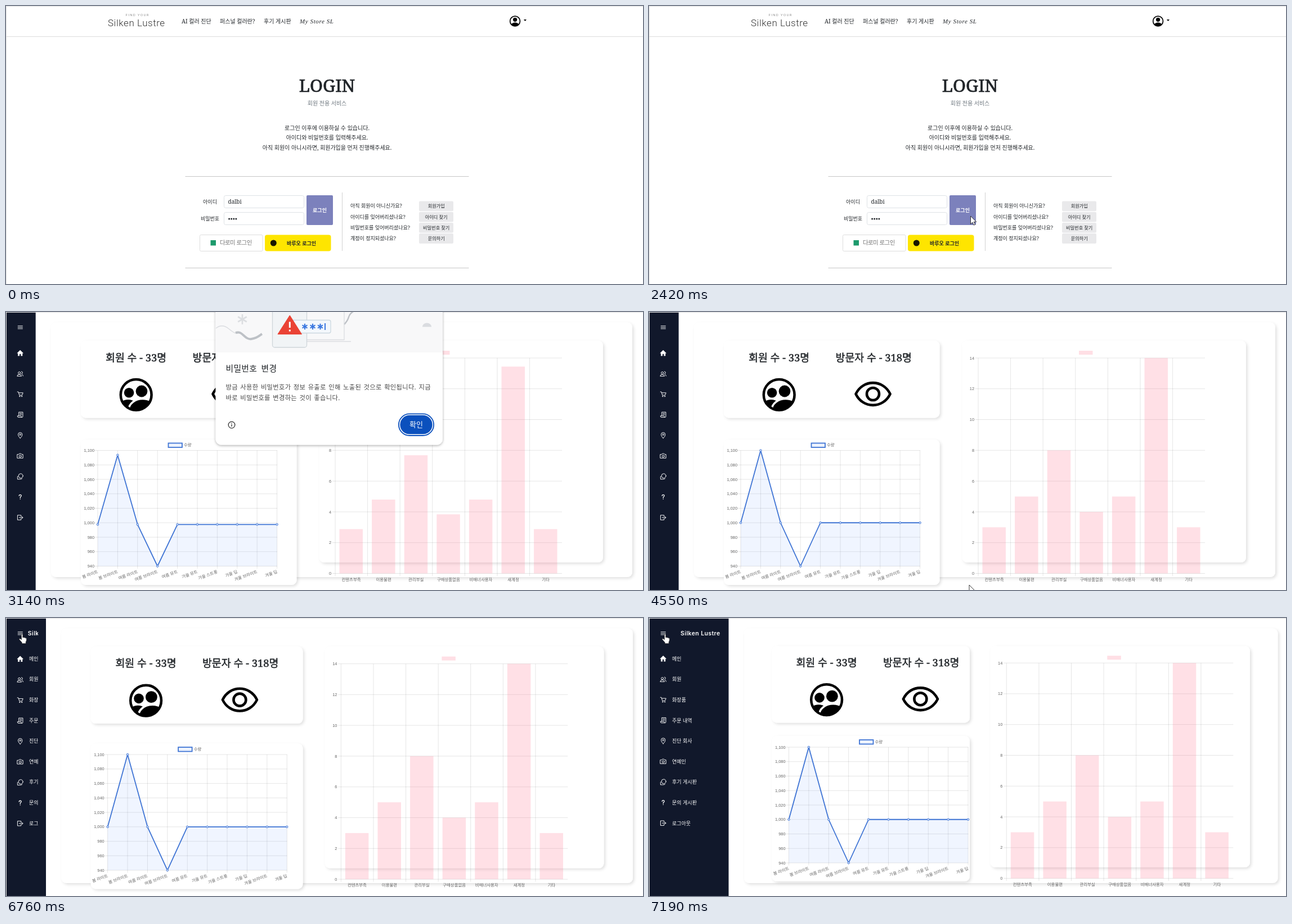
An HTML page for the animation above (8100 ms loop, 1132 by 495 pixels).

```html
<!DOCTYPE html>
<html lang="ko">
<head>
<meta charset="utf-8">
<title>Login and dashboard</title>
<style>
html, body { margin: 0; width: 100%; height: 100%; overflow: hidden; background: #fff; }
svg { display: block; width: 100%; height: 100%; }
text { font-family: "Noto Serif", "Noto Sans CJK KR", "Noto Sans CJK", serif; fill: #212529; }
.sans text, text.sans { font-family: "Noto Sans CJK KR", "Noto Sans CJK", sans-serif; }
.chart text { font-family: "Liberation Sans", "Noto Sans CJK KR", "Noto Sans CJK", sans-serif; font-size: 7.4px; fill: #666; }
.note { letter-spacing: .3px; word-spacing: 1px; }
.grid { stroke: #000; stroke-opacity: .1; fill: none; }
.icon { fill: none; stroke: #fff; stroke-width: 1; stroke-linejoin: round; stroke-linecap: round; }
</style>
</head>
<body>
<svg id="stage" viewBox="0 0 1132 495" preserveAspectRatio="none"></svg>
<script>
const LOOP = 8100;
// [first step, last step, number of steps]
const STEPS = [
  [0, 0, 1], [1200, 2010, 9], [2110, 2420, 4], [2540, 2840, 4], [2940, 3540, 7], [3950, 3950, 1],
  [4550, 5360, 9], [5460, 5960, 6], [6560, 6760, 3], [6870, 7190, 4]
];
const BLUE = '#3f74d4';

const range = n => Array.from({ length: n }, (_, i) => i);
const mix = (a, b, p) => a + (b - a) * p;
const clamp = v => Math.max(0, Math.min(1, v));
const $ = id => document.getElementById(id);

const text = (x, y, size, str, more = '') => `<text x="${x}" y="${y}" font-size="${size}" ${more}>${str}</text>`;
const mid = (x, y, size, str, more = '') => text(x, y, size, str, 'text-anchor="middle" ' + more);
const rect = (x, y, w, h, r, fill, more = '') =>
  `<rect x="${x}" y="${y}" width="${w}" height="${h}" rx="${r}" fill="${fill}" ${more}/>`;
const circle = (x, y, r, more = '') => `<circle cx="${x}" cy="${y}" r="${r}" ${more}/>`;
const path = (d, more = '') => `<path d="${d}" ${more}/>`;
const frameEdge = path('M0 .5H1132M.5 0V495', 'stroke="#e2e2e2"');

// ---- login page ----
function loginPage() {
  const help = [
    ['아직 회원이 아니신가요?', '회원가입'], ['아이디를 잊어버리셨나요?', '아이디 찾기'],
    ['비밀번호를 잊어버리셨나요?', '비밀번호 찾기'], ['계정이 정지되셨나요?', '문의하기']
  ];
  return rect(0, 0, 1132, 495, 0, '#fff') + frameEdge + path('M0 54.5H1132', 'stroke="#dcdcdc"') +
    mid(233.7, 18.3, 6, 'FIND YOUR', 'style="font-family:Roboto,sans-serif;font-weight:300;letter-spacing:1.4px;fill:#555"') +
    text(181, 36, 17, 'Silken Lustre', 'style="font-family:Roboto,sans-serif;font-weight:300;letter-spacing:.55px;fill:#333"') +
    text(312, 30.5, 10, 'AI 컬러 진단') + text(380, 30.5, 10, '퍼스널 컬러란?') + text(458, 30.5, 10, '후기 게시판') +
    text(522, 31, 11, 'My Store SL', 'style="font-family:\'Liberation Serif\',serif;font-style:italic;letter-spacing:.6px"') +
    circle(904.6, 27, 8.9, 'fill="#fff" stroke="#000" stroke-width="1.7"') + circle(904.6, 24.3, 3.6) +
    path('M897.6 32.2Q904.6 26.5 911.6 32.2Q904.6 39 897.6 32.2Z') + path('M920 24H925L922.5 27Z') +
    mid(570.5, 153, 31, 'LOGIN', 'stroke="#212529" stroke-width=".7"') +
    mid(570.5, 176.5, 10, '회원 전용 서비스', 'style="fill:#6c757d"') +
    mid(570.5, 220.7, 10, '로그인 이후에 이용하실 수 있습니다.') +
    mid(570.5, 238.2, 10, '아이디와 비밀번호를 입력해주세요.') +
    mid(570.5, 255.7, 10, '아직 회원이 아니시라면, 회원가입을 먼저 진행해주세요.') +
    path('M318.5 303.5H822.5M318.5 466.5H822.5', 'stroke="#c6c6c6"') + path('M597.5 332V436', 'stroke="#d2d2d2"') +
    mid(362.5, 351.6, 9, '아이디') + mid(362.5, 381.6, 9, '비밀번호') +
    rect(387.5, 337.5, 142, 22, 3, '#fff', 'stroke="#dee2e6"') + rect(387.5, 367.5, 142, 22, 3, '#fff', 'stroke="#dee2e6"') +
    text(394.5, 352, 10, 'dalbi') + range(4).map(i => circle(396.6 + i * 4.1, 379, 1.5, 'fill="#212529"')).join('') +
    rect(534, 337, 47, 53, 2, '#7c81bc') + mid(557.5, 366.6, 9, '로그인', 'font-weight="700" style="fill:#fff"') +
    rect(344.5, 407.5, 111.5, 29, 2, '#fff', 'stroke="#dedede"') + rect(363.5, 417, 9.5, 9.5, 0, '#1d9a6c') +
    text(380, 425.3, 10.5, '다로미 로그인', 'class="sans" style="fill:#777;letter-spacing:-.6px"') +
    rect(460, 407.5, 117.5, 29, 4, '#fee500') + circle(475.3, 422, 5.5, 'fill="#181600"') +
    mid(525, 425.5, 9, '바루오 로그인', 'class="sans" font-weight="700"') +
    help.map(([q, b], i) => text(612, 359.3 + i * 19.2, 9, q) +
      rect(734, 347.5 + i * 19.2, 61, 17.8, 2, '#e9e9eb') + mid(764.7, 359.4 + i * 19.2, 8.2, b)).join('');
}

// ---- dashboard ----
// cards as [left, top, right, bottom], sidebar closed and open
const CARDS = [
  [[80, 18.5, 1113, 472], [169, 18.5, 1117.5, 472]],
  [[133, 51, 516.5, 188.5], [218.5, 50, 570, 186.5]],
  [[133, 227, 516.5, 486], [218.5, 210, 570, 469]],
  [[556.5, 51, 1061, 446], [606.5, 50, 1068, 444]]
];
const SALES = [1000, 1100, 1000, 940, 1000, 1000, 1000, 1000, 1000, 1000];
const SEASONS = ['봄 라이트', '봄 브라이트', '여름 라이트', '여름 브라이트', '여름 뮤트', '가을 뮤트', '가을 스트롱', '가을 딥', '겨울 브라이트', '겨울 딥'];
const REPORTS = [3, 5, 8, 4, 5, 14, 3];
const REASONS = ['컨텐츠부족', '이용불편', '관리부실', '구매상품없음', '비매너사용자', '새계정', '기타'];
const MENU = [
  ['메인', path('M-6.2 .3L0 -5.8L6.2 .3H4.3V5.3H1.2V1.5H-1.2V5.3H-4.3V.3Z', 'fill="#fff" stroke="none"')],
  ['회원', circle(-1.6, -1.4, 2.1) + path('M-5.6 4.3Q-5.4 1.4 -1.6 1.4T2.4 4.3ZM2.2 -4A2.1 2.1 0 0 1 2.4 .2M3.4 1.3Q5.4 2 5.5 4.3')],
  ['화장품', path('M-5.3 -4.5H-3.4L-1.5 1.8H3.6L5.3 -2.7H-2.8') + circle(-1, 4, .7) + circle(3, 4, .7)],
  ['주문 내역', path('M-2.6 2V-5H5V3Q5 4.8 3.2 4.8H-3.5Q-5.2 4.8 -5.2 2H1.7Q1.7 4.8 3.3 4.8M-.6 -2.6H3M-.6 -.3H3')],
  ['진단 회사', path('M0 5.4Q-3.9 1.8 -3.9 -1.4A3.9 3.9 0 0 1 3.9 -1.4Q3.9 1.8 0 5.4Z') + circle(0, -1.4, 1.4)],
  ['연예인', path('M-5.2 -2.8H-2.8L-1.6 -4.3H1.6L2.8 -2.8H5.2V4.2H-5.2Z') + circle(0, .6, 2.1)],
  ['후기 게시판', circle(1, -1, 4.2) + path('M-4.6 -.4Q-5.6 1.5 -5 3V5.2H-.5Q2 5.2 3.4 4.2')],
  ['문의 게시판', path('M-2 -2.2Q-2 -4.2 0 -4.2T2 -2.3Q2 -1 .1 .3V1.6M.1 3.8V4', 'stroke-width="1.4"')],
  ['로그아웃', path('M1.6 -2V-4.4H-5V4.4H1.6V2M-2 0H5M3 -2.1L5.1 0L3 2.1')]
];

function lineChart() {
  const ticks = range(9).map(i => {
    const y = 246.5 + i * 25.75;
    return path(`M158 ${y}H482`, 'class="grid"') +
      text(157, y + 2.6, 7.2, (1100 - i * 20).toLocaleString('en-US'), 'text-anchor="end"');
  }).join('');
  const cols = SEASONS.map((s, i) => {
    const x = 163 + i * 35.4;
    return path(`M${x} 246.5V457`, 'class="grid"') +
      `<g transform="translate(${x + 1} 464.5) rotate(-20)">${text(0, 0, 7.4, s, 'text-anchor="end"')}</g>`;
  }).join('');
  return ticks + cols + rect(288.5, 233.5, 24.5, 7.5, 0, '#edf3fe', `stroke="${BLUE}" stroke-width="1.8"`) +
    text(316, 239.3, 7.4, '수량') +
    path('', 'id="area" fill="#4285f4" fill-opacity=".08"') +
    path('', `id="line" fill="none" stroke="${BLUE}" stroke-width="1.8" stroke-linejoin="round"`) +
    SALES.map((_, i) => circle(163 + i * 35.4, 0, 1.8, `id="dot${i}" fill="#cfdffa" stroke="${BLUE}" stroke-width=".9"`)).join('');
}

function barChart() {
  const rows = range(8).map(i => {
    const y = 465.5 - i * 54.8;
    return path(`M580 ${y}H988`, 'class="grid"') + text(578, y + 2.6, 7.2, i * 2, 'text-anchor="end"');
  }).join('');
  return rows + rect(764, 69, 24.5, 7, 0, '#ffdfe5') +
    REASONS.map((s, i) => path(`M${585 + i * 57.6} 82V470`, 'class="grid"') + mid(613.5 + i * 57.6, 478.6, 7.6, s) +
      rect(592.5 + i * 57.6, 0, 41.5, 0, 0, '#ff6384', `id="bar${i}" fill-opacity=".2"`)).join('');
}

function summary() {
  const heavy = 'font-weight="500" stroke="#212529" stroke-width=".45"';
  return text(177, 87.5, 18.4, '회원 수 - 33명', heavy) + text(331.5, 87.5, 18.4, '방문자 수 - 318명', heavy) +
    '<clipPath id="disc">' + circle(231.2, 147.4, 27) + '</clipPath>' +
    '<g clip-path="url(#disc)">' + circle(218.6, 143.7, 8.8) + circle(241, 141, 10.4) +
    '<ellipse cx="217" cy="169.5" rx="17" ry="13.5"/><ellipse cx="243" cy="174.5" rx="25" ry="20" stroke="#fff" stroke-width="3.6"/></g>' +
    circle(231.2, 147.4, 27.4, 'fill="none" stroke="#000" stroke-width="4.5"') +
    '<g fill="none" stroke="#000" stroke-width="4.6" stroke-linejoin="round">' +
    path('M367.5 146C380 119.5 416 119.5 428.6 146C416 172.5 380 172.5 367.5 146Z') + circle(398, 146, 11) + '</g>';
}

function sidebar() {
  return rect(0, 1, 53, 494, 0, '#11182b', 'id="side"') +
    path('M20.8 24.8H29.8M20.8 27.3H29.8M20.8 29.8H29.8', 'stroke="#fff" stroke-width=".9"') +
    '<g id="menu">' + MENU.map(([, icon], i) =>
      `<g class="icon" transform="translate(25.2 ${73.2 + i * 36.6}) scale(.95)">${icon}</g>`).join('') + '</g>' +
    '<clipPath id="sideClip">' + rect(30, 0, 9, 495, 0, '#000', 'id="sideMask"') + '</clipPath>' +
    '<g id="labels" clip-path="url(#sideClip)" class="sans">' +
    text(39, 30.6, 10.5, 'Silken Lustre', 'id="brand" style="font-family:Inter,sans-serif;font-weight:600;letter-spacing:.4px;fill:#fff"') +
    MENU.map(([s], i) => text(41, 75.7 + i * 36.6, 9, s, 'style="fill:#fff"')).join('') + '</g>';
}

function dialog() {
  const star = (x, y, r, w, c) => range(3).map(i =>
    path(`M${x} ${y - r}V${y + r}`, `stroke="${c}" stroke-width="${w}" transform="rotate(${i * 60} ${x} ${y})"`)).join('');
  const note = (y, str) => text(390.5, y, 11.3, str, 'class="note" style="fill:#474747"');
  return rect(372.5, -20, 403.5, 256.5, 10, '#fff', 'filter="url(#lift)"') + rect(372.5, 0, 403.5, 72, 0, '#f8f8f9') +
    star(420, 13, 9, 2.6, '#dcdee1') +
    '<g fill="none" stroke="#dadce0" stroke-width="1.3">' +
    path('M373 29Q384 20 396 30T412 38') + path('M408 37C420 32 424 50 436 48S450 42 455 39', 'stroke="#bdc1c6" stroke-width="4"') +
    path('M601 22Q607 16 609 9T619 -2', 'stroke="#bdc1c6" stroke-width="2.5"') +
    path('M601 0V50M534 49.5H601M528 52.5H613') + rect(473.5, -10, 61, 73, 4, '#f1f4f6', 'stroke="#cfd6da"') +
    rect(498, 14.5, 79, 23, 3, '#f4f8fc', 'stroke="#cbd8e0"') + '</g>' +
    path('M740 26.5A8 7 0 0 1 756 26.5Z', 'fill="#dadce0"') +
    [531, 545, 558.5].map(x => star(x, 26, 5.2, 2.2, '#3b78e0')).join('') + path('M567 20V32', 'stroke="#3b78e0" stroke-width="2"') +
    path('M504.3 6L525.5 39.5H483Z', 'fill="#ea4335" stroke="#ea4335" stroke-linejoin="round"') +
    path('M504.3 17.5V28M504.3 31.5V34.5', 'stroke="#fff" stroke-width="3"') +
    text(390.5, 105.6, 14.8, '비밀번호 변경', 'style="letter-spacing:.3px;word-spacing:3px"') +
    note(138.4, '방금 사용한 비밀번호가 정보 유출로 인해 노출된 것으로 확인됩니다. 지금') +
    note(156.6, '바로 비밀번호를 변경하는 것이 좋습니다.') +
    circle(401, 201, 5.8, 'fill="none" stroke="#333" stroke-width="1.3"') + path('M401 200V204M401 197.6V198.9', 'stroke="#333" stroke-width="1.3"') +
    rect(697.9, 181.4, 62.2, 38.6, 19.3, '#fff', 'stroke="#0b50bd" stroke-width="1.8"') + rect(700.3, 183.8, 57.4, 33.8, 16.9, '#0b50bd') +
    mid(729, 205.3, 13, '확인', 'style="fill:#fff"');
}

const shadow = (id, dx, dy, blur, alpha) =>
  `<filter id="${id}" x="-10%" y="-10%" width="120%" height="120%"><feDropShadow dx="${dx}" dy="${dy}" stdDeviation="${blur}" flood-opacity="${alpha}"/></filter>`;

$('stage').innerHTML =
  '<defs>' + shadow('soft', 2.5, 2.5, 2.6, .12) + shadow('lift', 0, 1.5, 2, .32) + '</defs>' +
  `<g id="login">${loginPage()}</g>` +
  '<g id="dash">' + rect(0, 0, 1132, 495, 0, '#fff') +
  CARDS.map((_, i) => rect(0, 0, 0, 0, 9, '#fff', `id="card${i}" filter="url(#soft)"`)).join('') +
  `<g id="summary">${summary()}</g><g id="lines" class="chart">${lineChart()}</g><g id="bars" class="chart">${barChart()}</g>` +
  sidebar() + frameEdge + `<g id="dialog" class="sans">${dialog()}</g></g>` +
  '<g id="cursor" stroke="#222" stroke-linejoin="round">' +
  path('M0 0V14.2L3.4 11.2L5.6 16.2L8 15.1L5.8 10.3H10.2Z', 'id="arrow" fill="#fff" stroke-width=".9"') +
  path('M-.6 .8Q.6 -1 1.8 .8V6.2Q3.2 5 4.2 6.6Q5.6 5.7 6.4 7.2Q8.4 6.7 8.6 8.6Q8.8 12.5 7.2 14.4V17H.3V15.2L-4.6 9.6Q-4.6 7.8 -2.6 8.4L-.6 10Z', 'id="hand" fill="#fff" stroke-width=".7"') + '</g>';

// ---- timing ----
function snap(t) {
  const [a, b, n] = STEPS.filter(s => s[0] <= t).pop();
  if (n < 2) return a;
  const gap = (b - a) / (n - 1);
  return a + gap * Math.min(n - 1, Math.floor((t - a) / gap + 1e-6));
}

// the CSS "ease" curve
function ease(x) {
  if (x <= 0 || x >= 1) return clamp(x);
  let lo = 0, hi = 1;
  const bez = (s, a, b) => 3 * (1 - s) ** 2 * s * a + 3 * (1 - s) * s * s * b + s ** 3;
  for (let i = 0; i < 24; i++) {
    const m = (lo + hi) / 2;
    if (bez(m, .25, .25) < x) lo = m; else hi = m;
  }
  return bez(lo, .1, 1);
}

const smooth = u => u * u * (3 - 2 * u);
const MOVES = [
  [1200, 2010, 668, 487, 571.5, 374], [2540, 2840, 571.5, 374, 569, 500],
  [4550, 5360, 569, 486, 78, 129], [5360, 5960, 78, 129, 28, 28.5]
];
function pointer(t) {
  if (t < 1200 || t >= 2840 && t < 4550) return null;
  const [a, b, x0, y0, x1, y1] = MOVES.filter(m => m[0] <= t).pop();
  const u = smooth(clamp((t - a) / (b - a)));
  return [mix(x0, x1, u), mix(y0, y1, u)];
}

const set = (id, attrs) => { for (const k in attrs) $(id).setAttribute(k, attrs[k]); };
const show = (id, on) => $(id).setAttribute('display', on ? 'inline' : 'none');

function draw(time) {
  const t = snap(time);
  const open = ease((t - 6680) / 500);
  const grow = 1 - (1 - clamp((t - 2587) / 1000)) ** 4;

  show('login', t < 2540);
  show('dash', t >= 2540);
  show('dialog', t >= 2940 && t < 3950);

  CARDS.forEach(([a, b], i) => {
    const [x, y, r, d] = a.map((v, k) => mix(v, b[k], open));
    set('card' + i, { x, y, width: r - x, height: d - y });
  });
  const shift = (id, x, y) => set(id, { transform: `translate(${x * open} ${y * open})` });
  shift('summary', 84.4, -1.8);
  shift('lines', 85.5, -16.5);
  shift('bars', 50.3, -1.8);
  shift('menu', 0, -.8);

  const pts = SALES.map((v, i) => {
    const y = 452.5 - (v - 940) / 160 * 206 * grow;
    set('dot' + i, { cy: y });
    return `${163 + i * 35.4} ${y}`;
  }).join('L');
  set('line', { d: 'M' + pts });
  set('area', { d: `M163 452.5L${pts}V452.5Z` });
  REPORTS.forEach((v, i) => {
    const height = v * 27.4 * grow;
    set('bar' + i, { y: 465.5 - height, height });
  });

  const width = mix(52.7, 141.5, open);
  set('side', { width });
  set('sideMask', { width: width - 44 });
  set('brand', { x: 34.3 + 21.7 * open });
  show('labels', open > 0);

  const pos = pointer(t);
  show('cursor', pos);
  if (pos) {
    const onMenu = pos[0] < 40 && pos[1] < 45;
    set('cursor', { transform: `translate(${pos})` });
    show('hand', onMenu);
    show('arrow', !onMenu);
  }
}

const start = performance.now();
function tick() {
  draw((performance.now() - start) % LOOP);
  requestAnimationFrame(tick);
}
tick();
</script>
</body>
</html>
```
